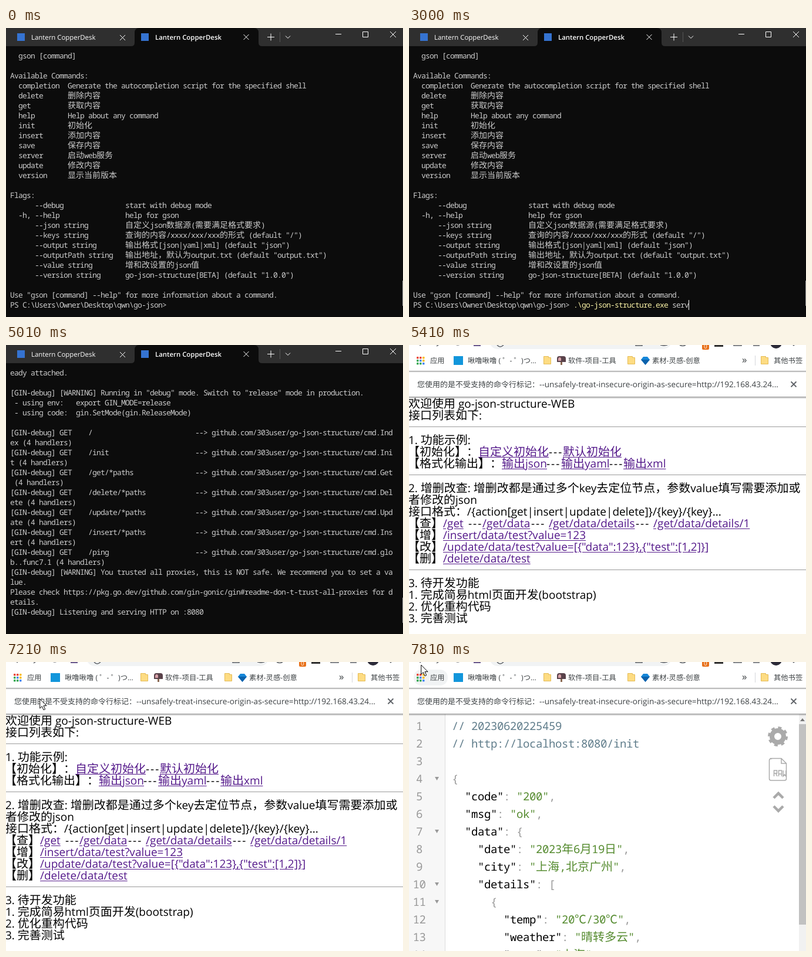
An HTML page for the animation above (8 s loop, 676 by 493 pixels).

```html
<!DOCTYPE html>
<html lang="zh-CN">
<head>
<meta charset="utf-8">
<title>go-json-structure</title>
<style>
html, body { margin: 0; width: 100%; height: 100%; overflow: hidden; background: #0c0c0c; }
#stage { position: relative; width: 676px; height: 493px; overflow: hidden; text-rendering: geometricPrecision; }
.layer, .layer > svg { position: absolute; left: 0; top: 0; width: 676px; height: 493px; overflow: hidden; }
.t { position: absolute; white-space: pre; line-height: 20px; text-spacing-trim: space-all; font-family: "Open Sans", "Noto Sans CJK SC", "Noto Sans CJK", sans-serif; }
.t i { font-style: normal; line-height: 0; letter-spacing: 0; font-family: "Noto Sans CJK SC", "Noto Sans CJK", sans-serif; }

#term { background: #0c0c0c; }
.row { color: #ccc; font: 13px/20px "Noto Sans Mono", monospace; letter-spacing: -.8px; }
.row i { font-size: 14px; }
.exe { color: #f9f1a5; }
.tab { color: #fff; font-size: 11.4px; }
.on { font-weight: 600; }
#caret { position: absolute; top: 464px; width: 1px; height: 17px; background: #fff; }

#web, #json { background: #fff; }
.body { color: #000; font-size: 19px; }
.body i { font-size: 20px; }
.dash { letter-spacing: 2px; }
.link { color: #551a8b; text-decoration: underline; text-underline-offset: 2px; }
.rule { position: absolute; left: 0; width: 676px; height: 1px; background: #9a9a9a; }
.mark { color: #3c4043; font-size: 12.3px; }
.info { color: #3c4043; font-size: 13.6px; }
.info i { font-size: 13px; }

.code { color: #999; font: 19px/20px "Noto Sans Mono", monospace; letter-spacing: -.4px; }
.code i { font-size: 20px; font-weight: 300; }
.num { width: 35px; text-align: center; }
.note { color: #607d8b; }
.key { color: #000; }
.str { color: #558b2f; }
#mouse, #beam { position: absolute; left: 0; top: 0; }
</style>
</head>
<body>
<div id="stage">
  <div id="term" class="layer">
    <svg viewBox="0 0 676 493" fill="none" stroke="#fff">
      <path d="M0 0H676V31H0z" fill="#2f2f2f" stroke="none"/>
      <path d="M213 31q6 0 6-6V8q0-8 8-8H422q8 0 8 8v17q0 6 6 6z" fill="#0c0c0c" stroke="none"/>
      <path d="M19 9h13v13H19zM230 9h13v13H230z" fill="#3573d1" stroke="none"/>
      <path d="M194 12l9 9m0-9l-9 9M404.500 11l9 9m0-9l-9 9M445 15.500h12m-6-6v12M476 13.500l4 4 4-4M561 10.500h10M607.500 6.500h9v9h-9zM654 6l10 10m0-10l-10 10"/>
      <path d="M466.500 7v17" stroke="#555"/>
      <path d="M675.500 431v43" stroke="#9a9a9a"/>
    </svg>
    <div id="help" class="layer"></div>
    <div id="log" class="layer"></div>
    <div id="caret"></div>
    <svg id="beam" viewBox="0 0 676 493" fill="none" stroke="#ddd"><path d="M491 460.500h2l1.500 1 1.500-1h2M494.500 461v15M491 477.500h2l1.500-1 1.500 1h2"/></svg>
  </div>

  <div id="web" class="layer"></div>

  <div id="json" class="layer">
    <svg viewBox="0 0 676 493">
      <path d="M0 89H61V493H0z" fill="#f7f7f7"/>
      <path d="M61.500 89V493" stroke="#ddd"/>
      <path d="M664 89h12V493h-12z" fill="#f1f1f1"/>
      <path d="M664 106h12V448h-12z" fill="#c1c1c1"/>
      <path d="M666 101l4-5 4 5z" fill="#777"/>
      <g fill="none" stroke="#aaa">
        <circle cx="628" cy="127" r="10" stroke-width="8"/>
        <circle cx="628" cy="127" r="14.500" stroke-width="5" stroke-dasharray="5.690"/>
        <path d="M616 164.500h18l8.500 8.500v26q0 3-3 3h-23q-3 0-3-3v-31q0-3 3-3zM634 164.500v8.500h8.500" stroke-width="1.500"/>
        <path d="M621 232l8-8 8 8M621 246l8 8 8-8" stroke-width="4.500"/>
        <path d="M621.500 195v-10h5v5h-5m3 0l2.500 5M629.500 195v-10h5v10m-5-4h5M637 185v10l2.500-3 2.500 3v-10" stroke-width="1.500"/>
      </g>
      <path id="folds" fill="#999"/>
    </svg>
  </div>

  <div id="browser" class="layer" style="height:92px">
    <svg viewBox="0 0 676 493">
      <defs>
        <linearGradient id="shade" x2="0" y2="1"><stop stop-color="#000" stop-opacity=".4"/><stop offset="1" stop-color="#000" stop-opacity="0"/></linearGradient>
      </defs>
      <path d="M0 0H676V88H0z" fill="#fff"/>
      <path d="M139 0q4 7 12 7H432q9 0 13-7z" fill="#f1f3f4"/>
      <rect id="hover" x="8" y="13" width="58" height="27" rx="13" fill="#f1f3f4"/>
      <g fill="none" stroke="#5f6368" stroke-width="1.500">
        <path d="M17 -1l3 2M47 2l4-3M78 -2q5 4 10 0M150 0q5 6 11 0M386 -2v3h11v-3M428 0l6 1 6-1M461 0q5 3 10 0M553 -1v2h13v-2M586 1h11"/>
      </g>
      <path d="M110 0h12v2h-12z" fill="#6b5a8e"/>
      <path d="M520 0h15v3h-15z" fill="#333"/>
      <rect x="499" y="-5" width="12" height="13" rx="2" fill="#e8711a"/>
      <circle cx="625" cy="-4" r="10" fill="#2b2a38"/>
      <circle cx="655" cy="0" r="1.500" fill="#5f6368"/>
      <g id="dots"></g>
      <path d="M76 19h16v15H76z" fill="#1296db"/>
      <g id="folders" fill="#fddc83" stroke="#e5bb55"></g>
      <path d="M252 29v-6q0-4 4-4h7q4 0 4 4v6z" fill="#59424a"/>
      <path d="M254 27v-3q0-3 2.500-3t2.500 3v3z" fill="#d9a3aa"/>
      <path d="M258 29h3v5h-3z" fill="#8b6a53"/>
      <path d="M395 25l4-5h7l4 5-7.500 9z" fill="#1687d9"/>
      <path d="M395 25h15l-7.500 9z" fill="#0b62ac"/>
      <path d="M589.500 18v17" stroke="#d5d7da"/>
      <rect y="44" width="676" height="3" fill="url(#shade)"/>
      <rect y="88" width="676" height="4" fill="url(#shade)"/>
      <path d="M650.500 62.500l9 9m0-9l-9 9" stroke="#5f6368" stroke-width="1.800"/>
    </svg>
  </div>
  <svg id="mouse" width="14" height="22" viewBox="0 0 14 22"><path d="M.7 1v16l3.600-3.500 2.700 6.300 2.700-1.200-2.700-6h5z" fill="#fff" stroke="#000"/></svg>
</div>

<script>
const $ = id => document.getElementById(id);
const wide = s => s.replace(/[\u2103\u3000-\u9fff\uff00-\uffef]+/g, '<i>$&</i>');

// Text starting at x, vertically centred on y
function put(box, x, y, text, cls) {
  const el = document.createElement('span');
  el.className = 't ' + cls;
  el.style.left = x + 'px';
  el.style.top = y - 10 + 'px';
  el.innerHTML = wide(text);
  $(box).append(el);
  return el;
}

// Terminal
const rowY = n => 46.5 + 17 * n;
const rows = (box, list) => list.forEach((s, n) => s && put(box, 7, rowY(n), s, 'row'));
const pair = (list, indent, col) => list.map(([a, b]) => (indent + a).padEnd(col) + b);

for (const [x, cls] of [[43, ''], [254, 'on']]) put('term', x, 16.5, 'Lantern CopperDesk', 'tab ' + cls);

rows('help', [
  '  gson [command]', '', 'Available Commands:',
  ...pair([
    ['completion', 'Generate the autocompletion script for the specified shell'],
    ['delete', '删除内容'], ['get', '获取内容'], ['help', 'Help about any command'],
    ['init', '初始化'], ['insert', '添加内容'], ['save', '保存内容'],
    ['server', '启动web服务'], ['update', '修改内容'], ['version', '显示当前版本']
  ], '  ', 14),
  '', 'Flags:',
  ...pair([
    ['    --debug', 'start with debug mode'],
    ['-h, --help', 'help for gson'],
    ['    --json string', '自定义json数据源(需要满足格式要求)'],
    ['    --keys string', '查询的内容/xxxx/xxx/xxx的形式 (default "/")'],
    ['    --output string', '输出格式[json|yaml|xml] (default "json")'],
    ['    --outputPath string', '输出地址，默认为output.txt (default "output.txt")'],
    ['    --value string', '增和改设置的json值'],
    ['    --version string', 'go-json-structure[BETA] (default "1.0.0")']
  ], '  ', 28),
  '', 'Use "gson [command] --help" for more information about a command.'
]);
const prompt = 'PS C:\\Users\\Owner\\Desktop\\qwn\\go-json> ';
const exe = '.\\go-json-structure.exe';
const input = put('help', 7, rowY(25), prompt, 'row');

const route = ([path, fn]) =>
  '[GIN-debug] GET    ' + path.padEnd(26) + '--> github.com/303user/go-json-structure/cmd.' + fn + ' (4 handlers)';
rows('log', [
  'eady attached.', '',
  '[GIN-debug] [WARNING] Running in "debug" mode. Switch to "release" mode in production.',
  ' - using env:   export GIN_MODE=release',
  ' - using code:  gin.SetMode(gin.ReleaseMode)', '',
  ...[['/', 'Index'], ['/init', 'Init'], ['/get/*paths', 'Get'], ['/delete/*paths', 'Delete'],
    ['/update/*paths', 'Update'], ['/insert/*paths', 'Insert'], ['/ping', 'glob..func7.1']].map(route),
  '[GIN-debug] [WARNING] You trusted all proxies, this is NOT safe. We recommend you to set a value.',
  'Please check https://pkg.go.dev/github.com/gin-gonic/gin#readme-don-t-trust-all-proxies for details.',
  '[GIN-debug] Listening and serving HTTP on :8080'
].flatMap(s => s.match(/.{1,93}/g) || ['']));

// Browser bars
const dotColors = ['#ea4335', '#ea4335', '#fbbc05', '#34a853', '#4285f4', '#fbbc05', '#34a853', '#34a853', '#4285f4'];
$('dots').innerHTML = dotColors.map((c, i) =>
  `<rect x="${13 + i % 3 * 5}" y="${20 + (i / 3 | 0) * 5}" width="3.500" height="3.500" rx="1" fill="${c}"/>`).join('');
$('folders').innerHTML = [229, 372, 599].map(x => `<path d="M${x}.500 19.500h8v2h4v11h-12z"/>`).join('');
for (const [x, s] of [[36, '应用'], [100, '啾噜啾噜 ( ゜- ゜)つ...'], [271, '软件-项目-工具'],
  [414, '素材-灵感-创意'], [621, '其他书签']]) put('browser', x, 27, s, 'mark');
put('browser', 567, 25, '»', 'mark').style.fontSize = '17px';
const badge = put('browser', 502, 2, '0', 'mark');
badge.style.color = '#fff';
badge.style.fontSize = '10px';
put('browser', 14, 67, '您使用的是不受支持的命令行标记：--unsafely-treat-insecure-origin-as-secure=http://192.168.43.24...', 'info');

// Welcome page
for (const [x, y, s] of [
  [-1, 100, '欢迎使用 go-json-structure-WEB'], [-1, 120, '接口列表如下:'],
  [-1, 162, '1. 功能示例:'], [-2, 182, '【初始化】：'], [-2, 202, '【格式化输出】：'],
  [-1, 244, '2. 增删改查: 增删改都是通过多个key去定位节点，参数value填写需要添加或'],
  [-1, 264, '者修改的json'],
  [-1, 284, '接口格式：/{action[get|insert|update|delete]}/{key}/{key}...'],
  [-2, 304, '【查】'], [-2, 324, '【增】'], [-2, 344, '【改】'], [-2, 364, '【删】'],
  [-1, 406, '3. 待开发功能'], [-1, 426, '1. 完成简易html页面开发(bootstrap)'],
  [-1, 446, '2. 优化重构代码'], [-1, 466, '3. 完善测试']
]) put('web', x, y, s, 'body');
for (const [x, y] of [[238, 182], [234, 202], [341, 202], [101, 304], [208, 304], [386, 304]])
  put('web', x, y, '---', 'body dash');
for (const [x, y, s] of [
  [118, 182, '自定义初始化'], [262, 182, '默认初始化'],
  [158, 202, '输出json'], [259, 202, '输出yaml'], [365, 202, '输出xml'],
  [58, 304, '/get'], [125, 304, '/get/data'], [238, 304, '/get/data/details'], [416, 304, '/get/data/details/1'],
  [58, 324, '/insert/data/test?value=123'],
  [58, 344, '/update/data/test?value=[{"data":123},{"test":[1,2]}]'],
  [58, 364, '/delete/data/test']
]) put('web', x, y, s, 'body link');
for (const y of [139, 221, 383]) {
  const rule = document.createElement('div');
  rule.className = 'rule';
  rule.style.top = y + 'px';
  $('web').append(rule);
}

// JSON viewer
[
  '// 20230620225459', '// http://localhost:8080/init', '', '{',
  '  "code": "200",', '  "msg": "ok",', '  "data": {',
  '    "date": "2023年6月19日",', '    "city": "上海,北京广州",', '    "details": [',
  '      {', '        "temp": "20℃/30℃",', '        "weather": "晴转多云",', '        "name": "上海",'
].forEach((s, n) => {
  const y = 109 + 30 * n;
  put('json', 0, y, String(n + 1), 'code num');
  const line = put('json', 73, y, s, s.startsWith('//') ? 'code note' : 'code');
  line.innerHTML = wide(s).replace(/("[^"]*")(:?)/g, (m, str, colon) =>
    `<span class=${colon ? 'key' : 'str'}>${str}</span>${colon}`);
});
$('folds').setAttribute('d', [4, 7, 10, 11].map(n => `M44 ${76 + 30 * n}h7l-3.500 6z`).join(''));

// Stepped timeline: the last entry whose time has passed
const at = (list, t) => list.filter(e => e[0] <= t).pop();
const typed = [[0, ''], [800, 'go'], [1200, exe], [1800, exe + ' s'], [2000, exe + ' se'], [2200, exe + ' ser'],
  [3000, exe + ' serv'], [3200, exe + ' serve'], [3400, exe + ' server']];
const caretOn = [[0, 0], [400, 1], [3600, 0], [3800, 1], [5010, 0]];
const scenes = [[0, 'help'], [4400, 'log'], [5410, 'web'], [6210, 'json'], [6810, 'web'], [7410, 'json']];
const pointer = [[0, -50, 0], [5610, 330, 300], [5810, 250, 235], [6010, 180, 184], [6410, 90, 80], [6610, 20, 4],
  [7010, 30, 22], [7210, 57, 62], [7410, 178, 184], [7610, 27, 24], [7810, 20, 4]];
const show = (id, on) => $(id).style.visibility = on ? 'visible' : 'hidden';

let shown = '';
function draw(now) {
  const t = now % 8000;
  const scene = at(scenes, t)[1];
  for (const id of ['help', 'log', 'web', 'json']) show(id, id === scene);
  show('browser', t >= 5410);
  show('beam', t >= 400 && t < 800);
  show('caret', t < 5410 && at(caretOn, t)[1]);

  const cmd = at(typed, t)[1];
  if (cmd !== shown) {
    const [name, arg] = cmd.split(' ');
    input.innerHTML = prompt + `<span class="exe">${name}</span>` + (arg ? ' ' + arg : '');
    shown = cmd;
  }
  $('caret').style.left = 7 + (scene === 'log' ? 0 : 7 * (prompt.length + cmd.length)) + 'px';

  const [, x, y] = at(pointer, t);
  $('mouse').style.transform = `translate(${x}px, ${y}px)`;
  show('hover', t >= 5410 && x > 0 && x < 66 && y < 40);
  requestAnimationFrame(draw);
}
draw(0);
</script>
</body>
</html>
```
